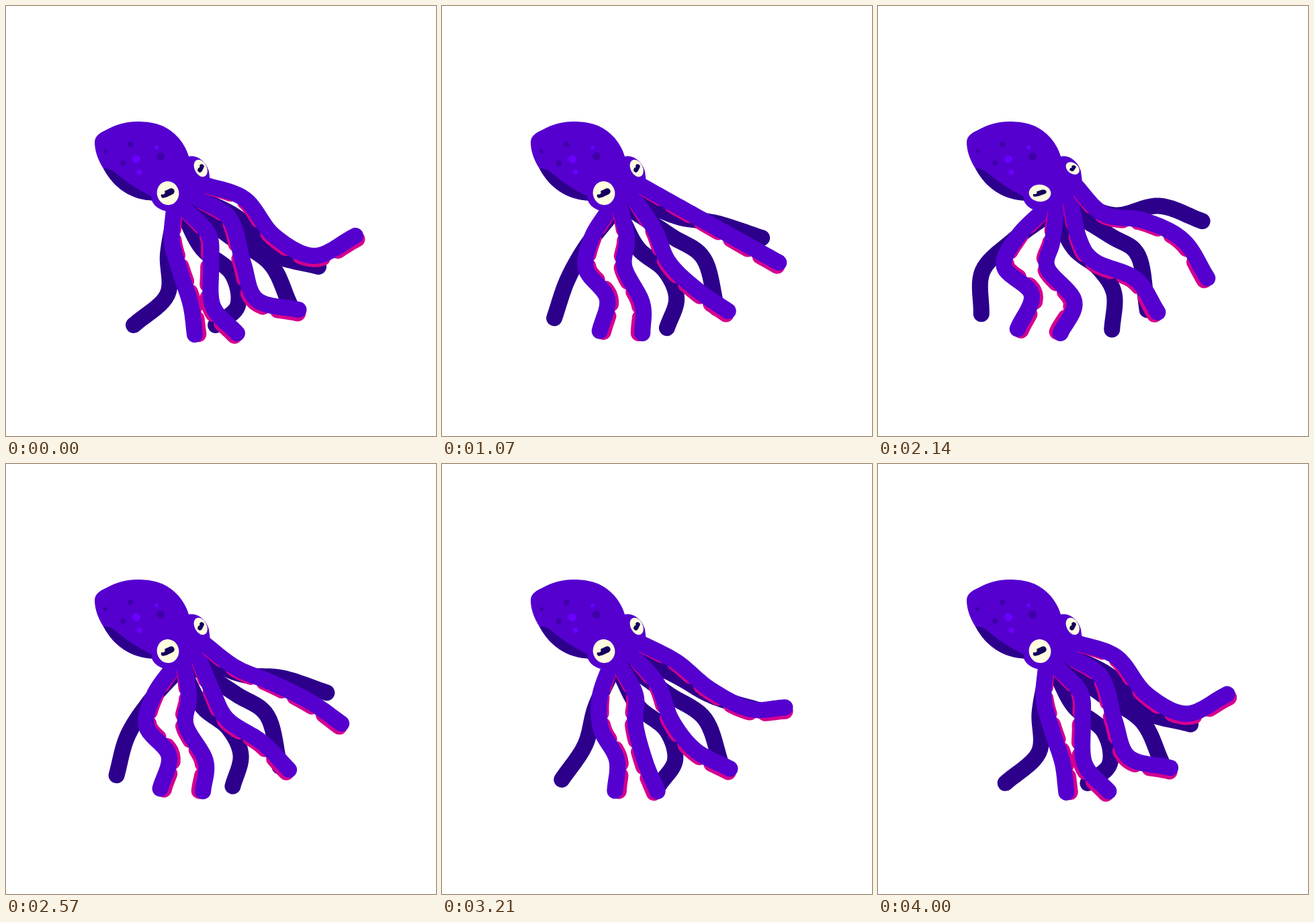
These frames come from a looping animation (640 px wide and 640 px high, 4.07 s). An HTML page:

```html
<!DOCTYPE html>
<html lang="en">
<head>
<meta charset="utf-8">
<title>Octopus</title>
<style>
html, body { margin: 0; width: 100%; height: 100%; overflow: hidden; background: #fff; }
svg { display: block; width: 100%; height: 100%; }
.arm { fill: none; stroke-width: 24; stroke-linecap: round; stroke-linejoin: round; }
.back { stroke: #2d008c; }
.front { stroke: #5500cf; }
.pink { stroke: #d4008f; stroke-dasharray: 12 9; stroke-dashoffset: 17; }
.pupil { stroke: #14005a; stroke-linecap: round; }
.cream { fill: #fffde0; }
</style>
</head>
<body>
<svg viewBox="0 0 640 640">
  <g id="arms"></g>
  <path fill="#5500cf" d="M132 203C132 192 142 188 150 184C164 176 180 172 195 172C210 172 222 174 233 178.500C254 188 267 207 272 224C285 221 298 232 302 246L304 262L290 285L262 303L243 306C230 305 220 298 217 289.500C185 288 160 270 145 242C136 228 132 214 132 203Z"/>
  <path fill="#2d008c" d="M145 242C154 241 159 245 165 250C182 264 198 274 216 283L218 289.500C185 288 160 270 145 242Z"/>
  <g fill="#4000a8">
    <circle cx="148" cy="216" r="3"/><circle cx="185" cy="206" r="4.300"/>
    <circle cx="174" cy="234" r="4"/><circle cx="230" cy="224" r="6"/>
  </g>
  <g fill="#6a00ff">
    <circle cx="194" cy="228" r="6"/><circle cx="198.500" cy="247.500" r="4"/><circle cx="224" cy="210.500" r="3"/>
  </g>
  <g class="eye" data-x="241" data-y="278.500">
    <ellipse class="cream" rx="16.300" ry="17.700" transform="rotate(-12)"/>
    <path class="pupil" stroke-width="9.500" d="M-3.500 1.500L5 -2.500"/>
    <path class="pupil" stroke-width="6.500" d="M-7 4L-4 3"/>
    <circle class="cream" cx="-7.500" cy="-1" r="3"/>
  </g>
  <g class="eye" data-x="289.700" data-y="241.500">
    <ellipse class="cream" rx="9" ry="13.500" transform="rotate(-27)"/>
    <path class="pupil" stroke-width="7" d="M-1 2.500L1.500 -2.500"/>
    <circle class="cream" cx="-3" cy="-2.500" r="1.800"/>
  </g>
</svg>
<script>
const LOOP = 4070, HALF = LOOP / 2;

// Each arm hangs from its root; key points (x, y) at rest and fully swept.
const arms = [
  { root: [287,286], rest: [347,317, 395,368, 465,388], swept: [352,311, 420,292, 484,315] },
  { root: [280,302], rest: [333,343, 393,383, 423,445], swept: [347,342, 387,371, 399,453] },
  { root: [266,313], rest: [292,361, 336,398, 345,446, 312,475], swept: [292,361, 328,390, 352,427, 351,482] },
  { root: [251,312], rest: [241,370, 240,430, 190,475], swept: [197,348, 149,392, 151,457] },
  { root: [250,301], rest: [247,350, 260,398, 275,445, 281,489], swept: [206,341, 182,387, 225,428, 202,480], side: -1 },
  { root: [266,302], rest: [302,341, 305,388, 308,447, 344,487], swept: [256,352, 248,390, 291,439, 266,487], side: 1 },
  { root: [286,287], rest: [334,316, 354,383, 373,438, 436,452], swept: [299,348, 322,380, 384,406, 416,456], side: 1, lag: 150 },
  { root: [292,265], rest: [355,287, 399,342, 459,372, 520,342], swept: [334,311, 397,318, 454,347, 488,410], side: 1, taut: true }
];
const blinks = [640, 2040];

const mix = (a, b, k) => a + (b - a) * k;

// 0 at rest, 1 fully swept: steady on the way out, easing on the way back
function sweep(t) {
  const u = t / HALF;
  return u < 1 ? u + 0.06 * Math.sin(Math.PI * u) : (2 - u) ** 1.4;
}

function pose(arm, t) {
  const p = sweep((t - (arm.lag || 0) + LOOP) % LOOP);
  const flat = [...arm.root, ...arm.rest.map((v, i) => mix(v, arm.swept[i], p))];
  const pts = [];
  for (let i = 0; i < flat.length; i += 2) pts.push([flat[i], flat[i + 1]]);
  if (!arm.taut || t > HALF) return pts;
  // the arm pulls straight halfway out
  const pull = Math.exp(-(((p - 0.58) / 0.2) ** 2)), n = pts.length - 1;
  return pts.map((pt, i) => pt.map((v, c) => mix(v, mix(pts[0][c], pts[n][c], i / n), pull)));
}

// Catmull-Rom samples: position, unit normal, fraction along the arm
function curve(pts) {
  const n = pts.length - 1, steps = 10, out = [];
  const beyond = (end, prev) => end.map((v, c) => 2 * v - prev[c]);
  const q = [beyond(pts[0], pts[1]), ...pts, beyond(pts[n], pts[n - 1])];
  for (let j = 0; j <= n * steps; j++) {
    const i = Math.min(n - 1, Math.floor(j / steps)), u = j / steps - i;
    const [[x, dx], [y, dy]] = [0, 1].map(k => {
      const [a, b, c, d] = q.slice(i, i + 4).map(pt => pt[k]);
      const k1 = c - a, k2 = 2 * a - 5 * b + 4 * c - d, k3 = 3 * b - a - 3 * c + d;
      return [b + (k1 * u + k2 * u * u + k3 * u ** 3) / 2, k1 + 2 * k2 * u + 3 * k3 * u * u];
    });
    const len = Math.hypot(dx, dy) || 1;
    out.push({ x, y, nx: -dy / len, ny: dx / len, s: j / (n * steps) });
  }
  return out;
}

// Outline shifted sideways, more towards the tip
const line = (samples, shift) => "M" + samples.map(({ x, y, nx, ny, s }) => {
  const d = shift * Math.sqrt(s);
  return (x + nx * d).toFixed(2) + " " + (y + ny * d).toFixed(2);
}).join("L");

function addPath(cls) {
  const el = document.createElementNS("http://www.w3.org/2000/svg", "path");
  el.setAttribute("class", "arm " + cls);
  el.setAttribute("pathLength", 100);
  return document.getElementById("arms").appendChild(el);
}

for (const arm of arms) {
  if (arm.side) arm.suckers = addPath("pink");
  arm.skin = addPath(arm.side ? "front" : "back");
}
const eyes = document.querySelectorAll(".eye");

function draw(t) {
  for (const arm of arms) {
    const samples = curve(pose(arm, t));
    arm.skin.setAttribute("d", line(samples, 0));
    if (arm.suckers) arm.suckers.setAttribute("d", line(samples, arm.side * 5.5));
  }
  const near = Math.min(...blinks.map(b => Math.abs(t - b)));
  const open = Math.min(1, Math.max(0.05, near / 140));
  for (const e of eyes)
    e.setAttribute("transform", `translate(${e.dataset.x} ${e.dataset.y}) scale(1 ${open})`);
}

const start = performance.now();
function tick() {
  draw((performance.now() - start) % LOOP);
  requestAnimationFrame(tick);
}
tick();
</script>
</body>
</html>
```
